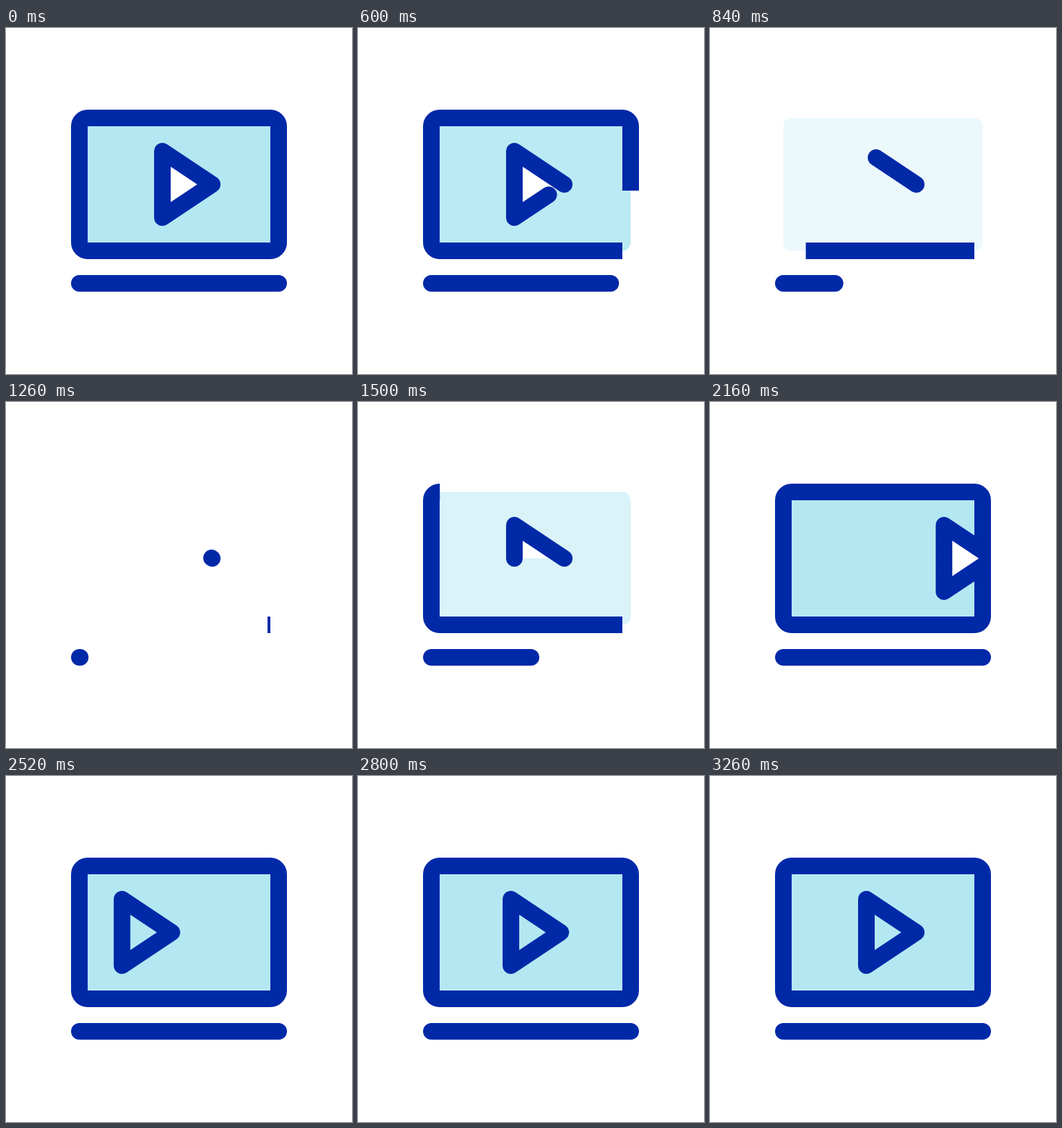
Animation, 500 px wide and 500 px high, one loop 4 s. Source, as an HTML page with a canvas:

```html
<!DOCTYPE html>
<html lang="en">
<head>
<meta charset="utf-8">
<title>Video player icon</title>
<style>
  html, body { margin: 0; width: 100%; height: 100%; overflow: hidden; background: #fff; }
  canvas { display: block; width: 500px; height: 500px; }
</style>
</head>
<body>
<canvas id="stage"></canvas>
<script>
const LOOP = 4000, STEP = 20, SIZE = 500;
const BLUE = '#0029a8', SCREEN = '#b3e8f2', WHITE = '#fff';

const ERASE = [500, 1010];
const DRAW = [1240, 1760];
const LEAVE = [1760, 2335];
const ENTER = [2320, 3260];
const TRAVEL = 200;

// Closed play triangle, starting at its right tip.
const TIP = [[298, 226], [226, 178], [226, 274], [298, 226]];

const canvas = document.getElementById('stage');
const ctx = canvas.getContext('2d');
const ratio = window.devicePixelRatio || 1;
canvas.width = canvas.height = SIZE * ratio;

const progress = (t, [from, to]) => Math.min(1, Math.max(0, (t - from) / (to - from)));
const smooth = u => u * u * (3 - 2 * u);

function drawnPart(t) {
  const k = t < DRAW[0] ? 1 - smooth(progress(t, ERASE)) : smooth(progress(t, DRAW));
  return k < 0.002 ? 0 : k;
}

// First part of a polyline, cut at the given fraction of its length.
function trim(points, part) {
  const lengths = points.slice(1).map((p, i) => Math.hypot(p[0] - points[i][0], p[1] - points[i][1]));
  let left = part * lengths.reduce((a, b) => a + b);
  const out = [points[0]];
  for (let i = 0; i < lengths.length && left > 0; i++) {
    const u = Math.min(1, left / lengths[i]);
    const [a, b] = [points[i], points[i + 1]];
    out.push([a[0] + (b[0] - a[0]) * u, a[1] + (b[1] - a[1]) * u]);
    left -= lengths[i];
  }
  return out;
}

function polyline(points, closed) {
  ctx.beginPath();
  points.forEach(p => ctx.lineTo(p[0], p[1]));
  if (closed) ctx.closePath();
}

// Rounded screen outline: bottom edge first, then left, top and right.
function framePath() {
  ctx.beginPath();
  ctx.moveTo(382, 322);
  ctx.lineTo(118, 322);
  ctx.arc(118, 310, 12, Math.PI / 2, Math.PI);
  ctx.lineTo(106, 142);
  ctx.arc(118, 142, 12, Math.PI, Math.PI * 1.5);
  ctx.lineTo(382, 130);
  ctx.arc(382, 142, 12, Math.PI * 1.5, Math.PI * 2);
  ctx.lineTo(394, 310);
  ctx.arc(382, 310, 12, 0, Math.PI / 2);
  ctx.closePath();
}

function drawScreen(part) {
  framePath();
  ctx.globalAlpha = part;
  ctx.fillStyle = SCREEN;
  ctx.fill();
  ctx.globalAlpha = 1;
  const length = 2 * (264 + 168) + 24 * Math.PI;
  ctx.lineCap = 'butt';
  ctx.setLineDash(part < 1 ? [length * part, length * 2] : []);
  ctx.stroke();
  ctx.setLineDash([]);
  ctx.lineCap = 'round';
}

function drawTriangle(shift, part, filled) {
  ctx.save();
  ctx.beginPath();
  ctx.rect(94, 118, 312, 216);
  ctx.clip();
  ctx.translate(shift, 0);
  polyline(trim(TIP, part), part === 1);
  if (filled) {
    ctx.fillStyle = WHITE;
    ctx.fill();
  }
  ctx.stroke();
  ctx.restore();
}

function render(t) {
  ctx.setTransform(ratio, 0, 0, ratio, 0, 0);
  ctx.fillStyle = WHITE;
  ctx.fillRect(0, 0, SIZE, SIZE);
  const part = drawnPart(t);
  if (!part) return;

  ctx.strokeStyle = BLUE;
  ctx.lineWidth = 24;
  ctx.lineCap = ctx.lineJoin = 'round';
  drawScreen(part);
  polyline(trim([[106, 369], [394, 369]], part));
  ctx.stroke();

  if (t < LEAVE[1]) {
    drawTriangle(TRAVEL * Math.pow(progress(t, LEAVE), 1.594), part, true);
  }
  if (t >= ENTER[0]) {
    drawTriangle(-TRAVEL * Math.pow(1 - progress(t, ENTER), 5.15), 1, false);
  }
}

const start = performance.now();
function tick() {
  const t = (performance.now() - start) % LOOP;
  render(Math.floor(t / STEP) * STEP);
  requestAnimationFrame(tick);
}
tick();
</script>
</body>
</html>
```
